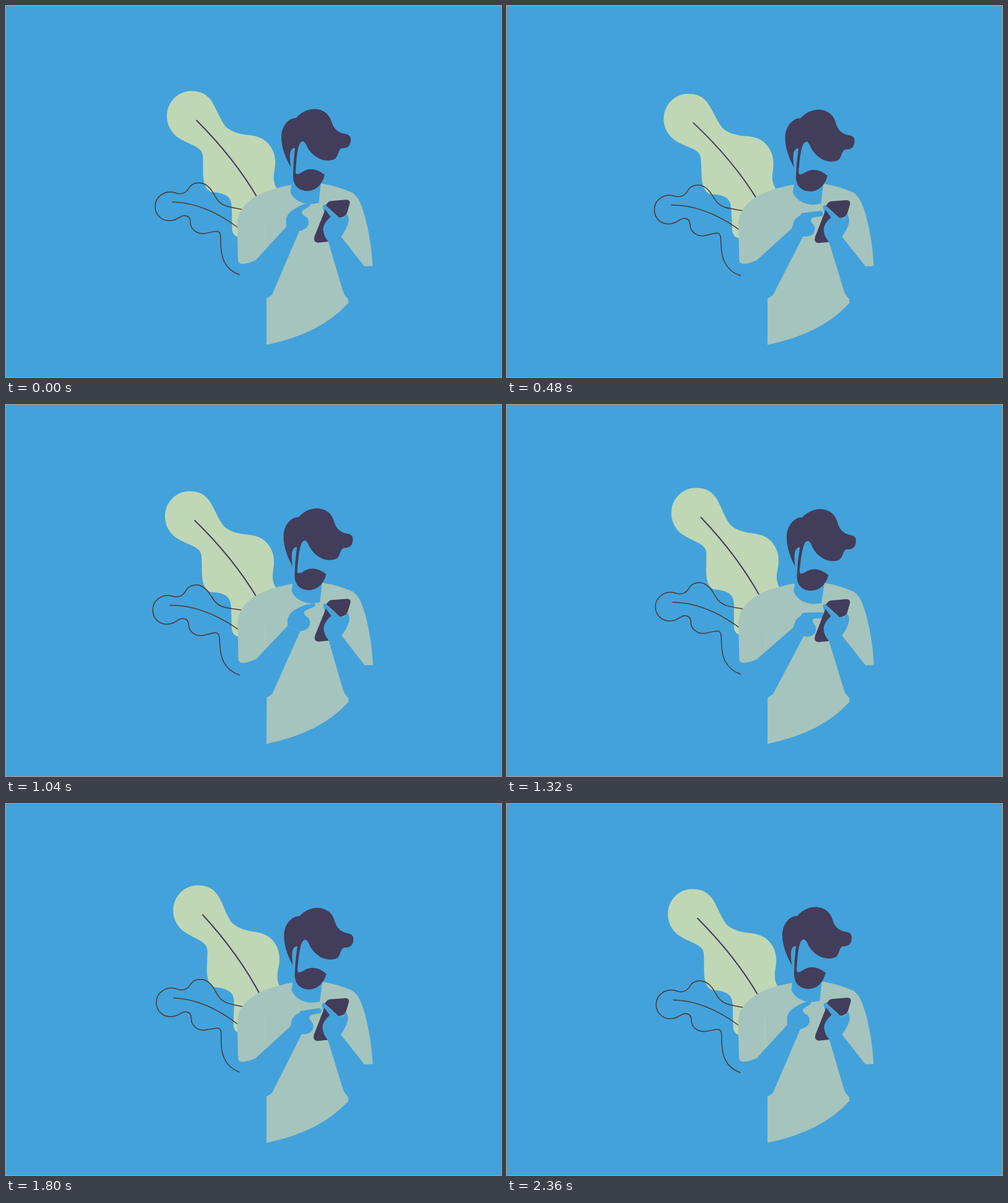
An HTML page with a canvas that plays this animation: 800 px wide and 600 px high, repeating every 2.4 s.

```html
<!DOCTYPE html>
<html lang="en">
<head>
<meta charset="utf-8">
<title>Man with phone</title>
<style>
  html, body { margin: 0; width: 100%; height: 100%; overflow: hidden; background: #43a2db; }
  canvas { display: block; }
</style>
</head>
<body>
<canvas id="stage" width="800" height="600"></canvas>
<script>
const ctx = document.getElementById('stage').getContext('2d');
const SKY = '#43a2db', LEAF = '#bfd7b5', SHIRT = '#a5c4be', DARK = '#423d5a', TWIG = '#4b3835';
const LOOP = 2400, STEP = 40;

// time, leaf angle, twig angle, tap, head tilt, body sway
const KEYS = [
  [0, 0, 0, 0, 0, 0],
  [320, -.022, -.013, 1, .56, .3],
  [680, -.033, -.05, .35, .42, .8],
  [1040, -.013, -.042, .15, .3, 1],
  [1320, .024, -.012, .97, .86, .7],
  [1800, .0435, .02, .75, .58, .2],
  [2360, 0, 0, 0, 0, 0],
];

const shapes = {
  leaf: `M331,152 C322,140 311,137.5 299,137.5 C276,138 260,157 260,178 C260,195 270,208 280,214
    C293,222 305,225 312,231 C320,237 318,246 318.5,260 C318,282 320,296 332,301
    C340,301.5 350,302 358,308 C364,313 365,321 365,332 L365.5,362 Q367,373 378,374
    L420,350 L440,320 L437,294 C432,285 432,277 434,265 C437,250 434,237 428,228
    C420,215 408,210 390,208.5 C375,207 362,202 355,195 C345,182 340,165 331,152Z`,
  leafVein: 'M308,185 Q370,247 408,313',
  twig: `M400,333 L382,329 C360,325 351,324 343,315 C335,305 333,295 322,288.5
    C312,283 300,287 296,294 C291,303 283,305 276,303 C258,296 241,308 241,324
    C241,340 254,349 268,347 C280,345 281,339 288,339 C295,339 298,343 298,350
    C298,362 310,369 320,368 C332,366 337,364 342,364.5 C347,366 347,372 347,382
    C347,405 352,425 377,434.5`,
  twigVein: 'M269,317 Q320,318 373,357 L386,367',
  shirt: `M462,289 C440,293 420,299 405,307 C385,319 374,334 373.5,352 L375,412 Q376,417 383,417
    Q394,416 403,411 L430,467 Q427,470 421,473 L421,548 Q509,530 553.5,480 L553,474
    Q547,468 545,462 L521,381 L541,373 L579,421 L592.5,420.5 C591,385 583,345 574,322
    Q569,309 560,302 Q538,292 509,287Z`,
  neck: 'M461,280 L461,289 L459.5,301 Q468,319 492,320.5 L505.5,318.5 L509,285 L509,275Z',
  head: `M460.5,261 Q445,234 445,212 C445,195 456,181 469,181 C476,173 486,167 498,166.5
    C514,167 523,176 526,187 C530,199 536,205 549,207 C556,208 558,213 557,219
    C556,228 550,230 543,230 C536,232 538,242 532,247 C524,252 510,250 503,245
    C493,239 488,231 485,224 Q480,215 475,222 Q470,232 468.5,262 Q467,271 470,272
    C477,272 481,264 493,264 Q504,264 515,273 C511,289 501,299 487,299
    C473,299 464,290 464,275 Q464,253 467,230 Q463,229 460,235 C458,240 459,252 460.5,261Z`,
  hand: `M453,357 L452.5,345 Q455,334 468,327 C478,321 490,317 491,320 Q493,323 487,325
    Q478,330 478,334 Q479,338 485,341 Q490,345 489,353 Q486,362 474,364Z`,
  holder: `M512,326 Q511,321 516,321.5 L535,340 L545,343 L551,336 Q555,342 553.5,350
    Q551,360 541.5,373 L579,421 L579,440 L547,466 L545,462 L521,381 L505,365 L516,341Z`,
  phone: `M516.5,322 L521,317 Q523,315.4 526,315.2 L550,313.3 Q557,313.5 555.5,320 L551,335
    Q547,343 538,342Z
    M516,329 L524.5,341 Q513,351 512.5,361 Q513,372 521,381 L504,382.7 Q496,382 498.5,373Z`,
};
for (const name in shapes) shapes[name] = new Path2D(shapes[name]);

function fill(shape, color) {
  ctx.fillStyle = color;
  ctx.fill(shape);
}

function stroke(shape, color, width) {
  ctx.strokeStyle = color;
  ctx.lineWidth = width;
  ctx.lineCap = 'round';
  ctx.stroke(shape);
}

function turned(x, y, angle, draw) {
  ctx.save();
  ctx.translate(x, y);
  ctx.rotate(angle);
  ctx.translate(-x, -y);
  draw();
  ctx.restore();
}

// Leans everything above the given height sideways by the slope
function lean(baseY, slope) {
  ctx.transform(1, 0, -slope, 1, slope * baseY, 0);
}

function slope(i, col) {
  if (i === 0 || i === KEYS.length - 1) return 0;
  const a = KEYS[i - 1], b = KEYS[i + 1];
  return (b[col] - a[col]) / (b[0] - a[0]);
}

// Cubic Hermite curve through the keys
function pose(t, col) {
  const i = KEYS.findIndex(k => k[0] > t) - 1;
  if (i < 0) return KEYS[KEYS.length - 1][col];
  const a = KEYS[i], b = KEYS[i + 1], span = b[0] - a[0];
  const u = (t - a[0]) / span, v = 1 - u;
  return a[col] * v * v * (1 + 2 * u) + b[col] * u * u * (1 + 2 * v)
    + span * u * v * (slope(i, col) * v - slope(i + 1, col) * u);
}

function drawTappingArm(tap) {
  const angle = tap * 22 * Math.PI / 180, c = Math.cos(angle), s = Math.sin(angle);
  const knuckle = [478, 334], dx = 16 * tap, dy = 14 * tap;
  const place = (x, y) => {
    const px = x - knuckle[0], py = y - knuckle[1];
    return [knuckle[0] + dx + px * c - py * s, knuckle[1] + dy + px * s + py * c];
  };
  ctx.fillStyle = SKY;
  ctx.beginPath();
  for (const p of [[404, 410.5], place(453, 357), place(474, 364), [430, 467], [400, 470]]) ctx.lineTo(...p);
  ctx.fill();
  ctx.save();
  ctx.translate(dx, dy);
  turned(...knuckle, angle, () => fill(shapes.hand, SKY));
  ctx.restore();

  const reach = Math.max(tap, 0);
  const finger = new Path2D();
  finger.moveTo(472 + 8 * reach, 332 + 9 * reach);
  finger.lineTo(488 + 20 * Math.sqrt(reach), 322.5 + 18.5 * reach ** 1.5);
  stroke(finger, SKY, 5 + 5 * reach);
}

function draw(t) {
  const [leaf, twig, tap, tilt, sway] = [1, 2, 3, 4, 5].map(col => pose(t, col));
  ctx.fillStyle = SKY;
  ctx.fillRect(0, 0, 800, 600);

  turned(445, 410, leaf, () => {
    fill(shapes.leaf, LEAF);
    stroke(shapes.leafVein, DARK, 2);
  });
  turned(433, 420, twig, () => {
    stroke(shapes.twig, TWIG, 1.5);
    stroke(shapes.twigVein, TWIG, 1.5);
  });

  ctx.save();
  lean(548, sway / 230);
  fill(shapes.shirt, SHIRT);
  ctx.fillStyle = '#adc9bc';
  ctx.fillRect(417, 345, 1, 48);
  turned(455, 375, tilt * .043, () => {
    fill(shapes.neck, SKY);
    fill(shapes.head, DARK);
  });
  drawTappingArm(tap);
  lean(462, (.4 * sway - 1.9 * tap) / 110);
  ctx.translate(0, .8 * tap);
  fill(shapes.holder, SKY);
  fill(shapes.phone, DARK);
  ctx.restore();
}

function tick() {
  const t = performance.now() % LOOP;
  draw(Math.floor(t / STEP) * STEP);
  requestAnimationFrame(tick);
}
tick();
</script>
</body>
</html>
```
